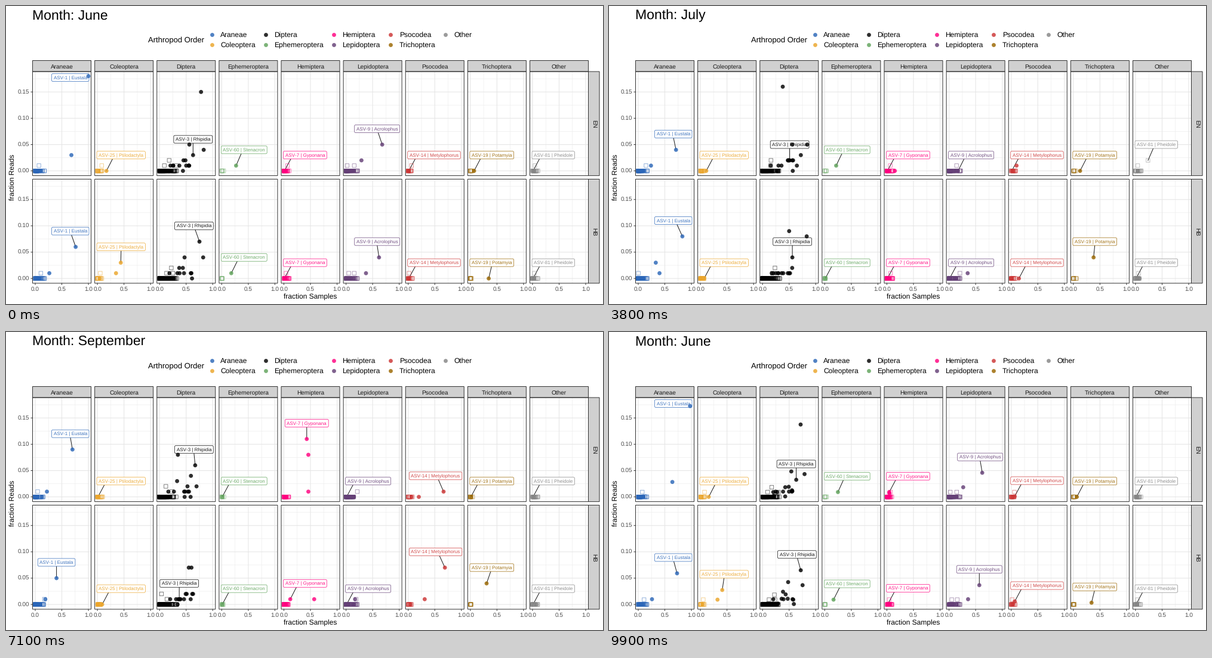
A matplotlib script for the animation above (10000 ms loop, 1000 px wide and 500 px high).

```python
import matplotlib.pyplot as plt
import numpy as np
from matplotlib.animation import FuncAnimation
from matplotlib.collections import LineCollection
from matplotlib.colors import to_rgba
from matplotlib.patches import FancyBboxPatch, Rectangle

plt.rcParams.update({"text.hinting": "none", "text.hinting_factor": 1,
                     "font.family": "Liberation Sans"})
PT = 0.72  # points per pixel at 100 dpi
MONTHS = ["June", "July", "September"]
# name, colour, label and how many variants crowd near zero
ORDERS = [
    ("Araneae", "#2b66b8", "ASV-1 | Eustala", 30),
    ("Coleoptera", "#eba52a", "ASV-25 | Ptilodactyla", 14),
    ("Diptera", "#000000", "ASV-3 | Rhipidia", 60),
    ("Ephemeroptera", "#5fa35a", "ASV-60 | Stenacron", 4),
    ("Hemiptera", "#ff007f", "ASV-7 | Gyponana", 20),
    ("Lepidoptera", "#643f76", "ASV-9 | Acrolophus", 38),
    ("Psocodea", "#cc3535", "ASV-14 | Metylophorus", 11),
    ("Trichoptera", "#9a6600", "ASV-19 | Potamyia", 6),
    ("Other", "#858585", "ASV-81 | Pheidole", 16),
]
ARA, COL, DIP, EPH, HEM, LEP, PSO, TRI, OTH = range(9)
EN, HB = 0, 1
LEFT, PITCH, WIDTH, UNIT = 44.5, 104.125, 98, 89.1
TOPS, HEIGHT = (110, 290.5), 174.6
ZERO = [t + HEIGHT - 7.95 for t in TOPS]
REST = (.01, 0)

rng = np.random.default_rng(8)
leads, dots, squares = [], [], []  # entries: (column, track of three positions)


def px(col, x):
    return LEFT + PITCH * col + 4.45 + UNIT * x


def py(row, y):
    return ZERO[row] - 8.83 * y


def add(out, col, row, xs, ys):
    track = np.column_stack([px(col, np.array(xs)), py(row, np.array(ys))])
    out.append((col, track))
    return track


def dot(col, row, june=REST, july=REST, sep=REST):
    """One variant, as (x, y in hundredths) per month."""
    return add(squares if col == OTH else dots, col, row, *zip(june, july, sep))


def lead(col, row, *args, **kw):
    leads.append((col, row, dot(col, row, *args, **kw)))


def crowd(col, row):
    n = ORDERS[col][3]
    reach = .03 + .005 * n
    zero = np.zeros(3)
    for out, count, far in (squares, n, reach), (dots, n * n // 120, .7 * reach):
        for _ in range(count):
            add(out, col, row, far * rng.random(3) ** 2.2, zero)
    # strays rise in a single month
    for k in range(n // 8):
        rise = np.eye(3)[k % 3]
        add(squares, col, row, reach * rng.random(3), rise * (1 + (k > 3)))


for c in range(9):
    for r in EN, HB:
        crowd(c, r)
# flies spread along a rising wedge
for r in EN, HB:
    for _ in range(11):
        x = .15 + .55 * rng.random(3) ** 1.4
        add(dots, DIP, r, x, np.round(4.5 * x * rng.random(3)))

lead(ARA, EN, (1, 18), (.71, 4), (.70, 9))
lead(ARA, HB, (.76, 6), (.83, 8), (.40, 5))
lead(COL, EN, (.17, 0), (.11, 0))
lead(COL, HB, (.44, 3), (.07, 0), (.09, 0))
lead(DIP, EN, (.63, 3), (.51, 2), (.67, 6))
lead(DIP, HB, (.75, 7), (.56, 4), (.37, 1))
lead(EPH, EN, (.27, 1), (.215, 1))
lead(EPH, HB, (.18, 1))
lead(HEM, EN, sep=(.43, 11))
lead(HEM, HB, sep=(.12, 1))
lead(LEP, EN, (.68, 5), (.17, 0))
lead(LEP, HB, (.62, 4))
lead(PSO, EN, sep=(.665, 1))
lead(PSO, HB, july=(.145, 0), sep=(.69, 7))
lead(TRI, EN, (.07, 0), (.126, 0))
lead(TRI, HB, (.345, 0), (.38, 4), (.305, 4))
lead(OTH, EN, july=(.235, 2))
lead(OTH, HB)

dot(ARA, EN, (.68, 3), (.24, 1), (.22, 1))
dot(ARA, HB, (.265, 1), (.33, 3), (.19, 1))
dot(ARA, HB, july=(.40, 1))
dot(COL, HB, june=(.35, 1))
dot(DIP, EN, june=(.78, 15))
dot(DIP, EN, july=(.38, 16))
dot(DIP, EN, (.56, 5), (.56, 5), (.33, 3))
dot(DIP, EN, (.44, 0), (.84, 5), (.27, 1))
dot(DIP, EN, (.55, 1), (.72, 3), (.59, 4))
dot(DIP, EN, june=(.83, 4), july=(.29, 0), sep=(.345, 8))
dot(DIP, HB, (.47, 4), (.50, 1), (.60, 7))
dot(DIP, HB, (.37, 2), (.50, 9), (.55, 7))
dot(DIP, HB, (.27, 0), (.83, 8), (.51, 2))
dot(DIP, HB, june=(.82, 4))
dot(HEM, EN, july=(.15, 0), sep=(.46, 8))
dot(HEM, EN, sep=(.46, 1))
dot(HEM, HB, sep=(.57, 1))
dot(LEP, EN, june=(.29, 2))
dot(LEP, HB, (.375, 1), (.35, 1), (.17, 1))
dot(PSO, EN, july=(.10, 1), sep=(.20, 0))
dot(PSO, HB, sep=(.31, 1))

fig = plt.figure(figsize=(10, 5), dpi=100, facecolor="white")
ax = fig.add_axes([0, 0, 1, 1])
ax.set(xlim=(0, 1000), ylim=(500, 0))
ax.axis("off")


def write(x, y, s, size, color="black", **kw):
    kw = {"va": "baseline", "zorder": 8, **kw}
    return ax.text(x, y, s, fontsize=size * PT, color=color, **kw)


def box(x, y, w, h, fill, z):
    ax.add_patch(Rectangle((x, y), w, h, fc=fill, ec="#333333", lw=PT,
                           zorder=z, snap=False))


def strokes(segs, color, width, z):
    ax.add_collection(LineCollection(segs, colors=color, linewidths=width * PT,
                                     zorder=z, snap=False))


def spread(tracks, marker, size, filled):
    """Scatter whose offsets are replaced on every frame."""
    cols = [to_rgba(ORDERS[c][1], .82 if filled else .55) for c, _ in tracks]
    pts = np.array([t[0] for _, t in tracks])
    return ax.scatter(*pts.T, s=(size * PT) ** 2, marker=marker,
                      facecolors=cols if filled else "none",
                      edgecolors="none" if filled else cols,
                      linewidths=0 if filled else .9 * PT, zorder=6, snap=False)


# facets
major, minor, ticks = [], [], []
for row, top in enumerate(TOPS):
    bottom = top + HEIGHT
    for col in range(9):
        x0 = LEFT + PITCH * col
        box(x0, top, WIDTH, HEIGHT, "none", 7)
        for i in range(5):
            x = px(col, i / 4)
            (minor if i % 2 else major).append([(x, top), (x, bottom)])
        for i in range(8):
            y = py(row, 2.5 * i)
            (minor if i % 2 else major).append([(x0, y), (x0 + WIDTH, y)])
    for y in range(0, 16, 5):
        ticks.append([(LEFT - 3, py(row, y)), (LEFT, py(row, y))])
        write(39, py(row, y) + 3.4, f"{y / 100:.2f}", 9.6, "#4d4d4d", ha="right")
    box(LEFT + 8 * PITCH + WIDTH, top, 18.5, HEIGHT, "#d0d0d0", 3)
    write(984.5, top + HEIGHT / 2 + 1, ("EN", "HB")[row], 10, "#1a1a1a",
          rotation=270, ha="center", va="center")
for col, (name, *_) in enumerate(ORDERS):
    x0 = LEFT + PITCH * col
    box(x0, 91.5, WIDTH, 18.5, "#d0d0d0", 3)
    write(x0 + WIDTH / 2, 105, name, 9.9, "#1a1a1a", ha="center")
    for x in (0, .5, 1):
        ticks.append([(px(col, x), 465), (px(col, x), 468)])
        write(px(col, x), 478.5, f"{x:.1f}", 9.6, "#4d4d4d", ha="center")
strokes(minor, "#ebebeb", .6, 1)
strokes(major, "#e6e6e6", 1.1, 1.1)
strokes(ticks, "#333333", 1, 2)

# titles and legend
title = write(44.5, 22.3, "", 22.6)
write(509.5, 492, "fraction Samples", 12, ha="center")
write(10.5, 287, "fraction Reads", 12.2, rotation=90, ha="center", va="center")
write(238, 61.5, "Arthropod Order", 12.6)
for k, (name, color, *_) in enumerate(ORDERS):
    x, y = (344.8, 434.8, 548.8, 644.2, 735.5)[k // 2], 47.5 + 17.2 * (k % 2)
    ax.scatter([x], [y], s=(6.8 * PT) ** 2, color=color, alpha=.82, lw=0, snap=False)
    write(x + 14.5, y + 4.6, name, 12.3)

dot_art = spread(dots, "o", 6.8, True)
sq_art = spread(squares, "s", 6.3, False)
dot_pos = np.array([t for _, t in dots])
sq_pos = np.array([t for _, t in squares])


class Tag:
    """Boxed name held above its point and kept inside the panel."""
    H = 13

    def __init__(self, col, row, pos):
        _, color, s, _ = ORDERS[col]
        self.pos = pos
        self.text = write(0, 0, s, 7.9, color, ha="center", zorder=5.1, alpha=.9)
        self.w = self.text.get_window_extent(fig.canvas.get_renderer()).width + 6.2
        self.x0, self.top = LEFT + PITCH * col, TOPS[row]
        self.box = FancyBboxPatch((0, 0), self.w, self.H, fc="white",
                                  ec=to_rgba(color, .85), lw=.8 * PT, zorder=5,
                                  boxstyle="round,pad=0,rounding_size=2", snap=False)
        ax.add_patch(self.box)
        self.line, = ax.plot([], [], color="#1a1a1a", lw=PT, zorder=4, snap=False)

    def place(self, p):
        half = self.w / 2
        cx = np.clip(p[0], self.x0 + 3.5 + half, self.x0 + WIDTH - 3.5 - half)
        cy = max(p[1] - 26.5, self.top + 3.5 + self.H / 2)
        self.box.set_bounds(cx - half, cy - self.H / 2, self.w, self.H)
        self.text.set_position((cx, cy + 2.8))
        edge = cy + self.H / 2
        ex = np.clip(p[0], cx - half, cx + half)
        gap = (p[1] - edge) / HEIGHT
        if gap > 0:
            # pull the joint toward the box centre, in panel-relative units
            ex += (cx - ex) * gap / np.hypot((p[0] - cx) / WIDTH, gap)
            self.line.set_data([ex, p[0]], [edge, p[1]])
        else:
            self.line.set_data([], [])


tags = [Tag(*args) for args in leads]


def draw(k):
    # three holds, each followed by a linear move of twelve frames
    p = np.interp(k, [0, 21, 33, 55, 67, 88, 100], [0, 0, 1, 1, 2, 2, 3])
    i, f = int(p), p % 1
    a, b = i % 3, (i + 1) % 3

    def blend(t):
        return t[..., a, :] * (1 - f) + t[..., b, :] * f

    dot_art.set_offsets(blend(dot_pos))
    sq_art.set_offsets(blend(sq_pos))
    for tag in tags:
        tag.place(blend(tag.pos))
    title.set_text("Month: " + MONTHS[int(p + .5) % 3])
    return []


anim = FuncAnimation(fig, draw, frames=100, interval=100, init_func=lambda: draw(0),
                     repeat=True, repeat_delay=0)
plt.show()
```
